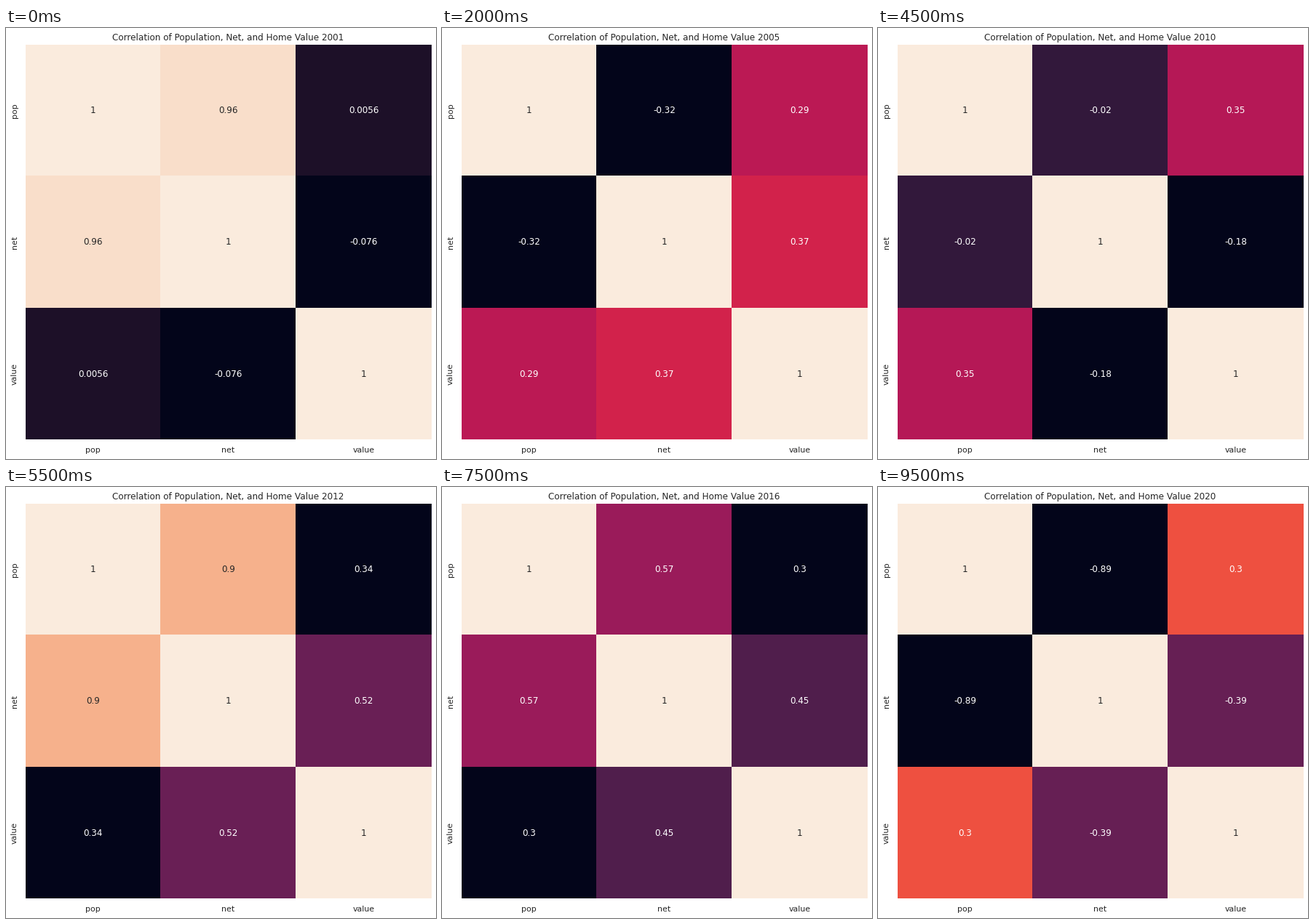
A matplotlib script for the animation above (10000 ms loop, 591 by 593 pixels).

```python
import matplotlib.pyplot as plt
import numpy as np
from matplotlib.animation import FuncAnimation
from matplotlib.colors import LinearSegmentedColormap

WIDTH, HEIGHT, DPI = 591, 593, 72
LEFT, TOP, AXES_W, AXES_H = 26.6, 22.6, 558, 543.6
DARK = "#262626"
LABELS = ["pop", "net", "value"]
YEARS = range(2001, 2021)

# Key years with correlations pop-net, pop-value, net-value
KEY_CORRELATIONS = {
    2001: (0.96, 0.0056, -0.076),
    2005: (-0.32, 0.29, 0.37),
    2008: (0.73, 0.33, 0.43),
    2010: (-0.02, 0.35, -0.18),
    2012: (0.9, 0.34, 0.52),
    2013: (0.91, 0.34, 0.52),
    2016: (0.57, 0.3, 0.45),
    2020: (-0.89, 0.3, -0.39),
}

# Evenly spaced from low to high
HEAT_COLORS = ["#03051a", "#1c1027", "#35193e", "#511e4d", "#701f57",
               "#8f1d5b", "#ad1759", "#cb1b4f", "#e13342", "#f05640",
               "#f37651", "#f5966e", "#f6b48f", "#f8d0b6", "#faebdd"]
cmap = LinearSegmentedColormap.from_list("heat", HEAT_COLORS)

plt.rcParams["font.family"] = "DejaVu Sans"
fig = plt.figure(figsize=((WIDTH + 1e-6) / DPI, (HEIGHT + 1e-6) / DPI),
                 dpi=DPI, facecolor="white")

# Data units are stage pixels, with y pointing down
ax = fig.add_axes([LEFT / WIDTH, 1 - (TOP + AXES_H) / HEIGHT,
                   AXES_W / WIDTH, AXES_H / HEIGHT])
ax.set(xlim=(LEFT, LEFT + AXES_W), ylim=(TOP + AXES_H, TOP))
ax.axis("off")

# Outer cells run past the axes and are clipped by it
mesh = ax.pcolormesh([0, 212, 398, WIDTH], [0, 203, 385, HEIGHT], np.eye(3), cmap=cmap)

columns = 119.47 + np.arange(3) * AXES_W / 3
rows = 113.7 + np.arange(3) * AXES_H / 3


def write(x, y, text="", size=12, ha="center", va="center", **style):
    return ax.text(x, y, text, size=size, ha=ha, va=va, color=DARK, **style)


for label, x, y in zip(LABELS, columns, rows):
    write(x, TOP + AXES_H + 9.5, label, size=11, va="top")
    write(LEFT - 9.5, y, label, size=11, ha="right", rotation="vertical")
title = write(columns[1], TOP - 5.6, va="baseline")
notes = [write(x, y) for y in rows for x in columns]


def correlation_matrix(year):
    pop_net, pop_value, net_value = (
        np.interp(year, list(KEY_CORRELATIONS), series)
        for series in zip(*KEY_CORRELATIONS.values()))
    return np.array([[1, pop_net, pop_value],
                     [pop_net, 1, net_value],
                     [pop_value, net_value, 1]])


def luminance(color):
    rgb = np.array(color[:3])
    linear = np.where(rgb <= 0.03928, rgb / 12.92, ((rgb + 0.055) / 1.055) ** 2.4)
    return linear @ [0.2126, 0.7152, 0.0722]


def update(year):
    matrix = correlation_matrix(year)
    mesh.set_array(matrix)
    mesh.set_clim(matrix.min(), 1)
    for note, value in zip(notes, matrix.flat):
        note.set_text(f"{value:.2g}")
        note.set_color(DARK if luminance(mesh.to_rgba(value)) > 0.408 else "white")
    title.set_text(f"Correlation of Population, Net, and Home Value {year}")
    return [mesh, title, *notes]


anim = FuncAnimation(fig, update, frames=YEARS, interval=500,
                     repeat=True, repeat_delay=0)
plt.show()
```
